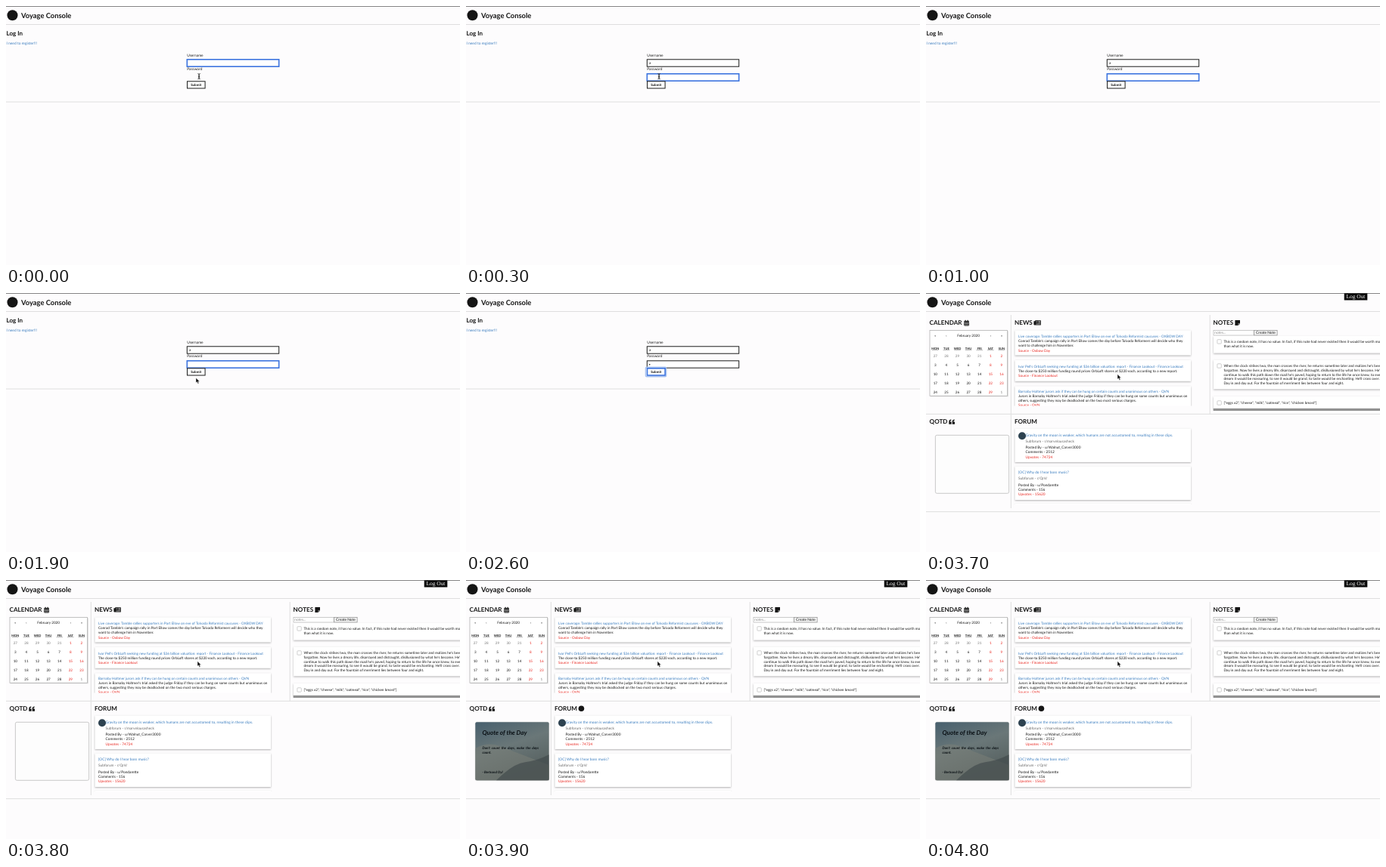
Write an HTML page that moves like this. It is 600 px wide and 343 px high and loops after 5000 ms.

```html
<!DOCTYPE html>
<html lang="en">
<head>
<meta charset="utf-8">
<title>Voyage Console</title>
<style>
html, body { margin: 0; width: 100%; height: 100%; overflow: hidden; background: #fdfcfd; }
svg { display: block; }
text { font-family: Lato, sans-serif; text-rendering: geometricPrecision; white-space: pre; }
.card { fill: #fff; filter: drop-shadow(0 1.4px 1.1px rgba(0, 0, 0, .3)); }
</style>
</head>
<body>
<svg id="stage" xmlns="http://www.w3.org/2000/svg" width="600" height="343" viewBox="0 0 600 343"></svg>
<script>
const LOOP = 5000;
const INK = "#151515", BLUE = "#3579bd", RED = "#e8231c", GREY = "#666", RULE = "#dedede";

const text = (x, y, str, { size = 4.8, fill = INK, extra = "" } = {}) =>
  `<text x="${x}" y="${y}" font-size="${size}" fill="${fill}" ${extra}>${str}</text>`;
const rect = (x, y, w, h, fill, extra = "") =>
  `<rect x="${x}" y="${y}" width="${w}" height="${h}" fill="${fill}" ${extra}/>`;
const line = (x1, y1, x2, y2, color = RULE, width = 1) =>
  `<path d="M${x1} ${y1}L${x2} ${y2}" stroke="${color}" stroke-width="${width}"/>`;
const group = (id, body, extra = "") => `<g id="${id}" ${extra}>${body}</g>`;

const BOLD = 'font-weight="700"', ITALIC = 'font-style="italic"', MIDDLE = 'text-anchor="middle"';
const heading = (x, y, str) => text(x, y, str, { size: 8.1, extra: BOLD });
const card = (x, y, w, h) => rect(x, y, w, h, "#fff", 'class="card"');

function header() {
  return line(0, .5, 600, .5, "#858585") +
    `<circle cx="8.5" cy="12.2" r="7" fill="${INK}"/>` +
    text(20, 15.7, "Voyage Console", { size: 9.4, extra: BOLD }) +
    line(0, 24.5, 600, 24.5);
}

function login() {
  const field = (id, y) => `<rect id="${id}" x="239.3" y="${y}" width="121.4" height="9.4" fill="#fff"/>`;
  return text(.5, 39.2, "Log In", { size: 8, extra: BOLD }) +
    text(.4, 51.2, "I need to register!!!", { fill: BLUE, size: 4.9 }) +
    text(239.3, 66.8, "Username") +
    text(239.3, 85.4, "Password") +
    field("userField", 70.8) + field("passField", 89.8) +
    text(242, 77.2, "a", { extra: 'id="userText"' }) +
    `<circle id="passText" cx="242.7" cy="94.7" r=".8" fill="${INK}"/>` +
    rect(237.4, 98.2, 27.2, 12.6, "none", 'id="glow" rx="1.5" stroke="#a9c3f0" stroke-width="1.4"') +
    rect(239.5, 99.8, 23.6, 9.2, "#fff", 'id="submit"') +
    text(251.2, 106, "Submit", { size: 4.5, extra: `${BOLD} ${MIDDLE}` }) +
    line(0, 127, 600, 127);
}

function calendar() {
  const col = i => 12.3 + i * 14.6;
  const cell = (i, y, str, fill) => text(col(i), y, str, { fill, size: 4.6, extra: MIDDLE });
  let out = heading(4.6, 42, "CALENDAR") +
    rect(50.2, 37, 6.8, 6.4, INK, 'rx=".8"') +
    rect(51.5, 35.8, 1.2, 2, INK) + rect(54.5, 35.8, 1.2, 2, INK) +
    line(50.2, 38.9, 57, 38.9, "#fff", .5) +
    `<path d="M51.2 40.5h5M51.2 42.2h5" stroke="#fff" stroke-width=".9" stroke-dasharray="1.1 .8"/>` +
    rect(5.8, 50.3, 103, 87, "#000", 'opacity=".13"') +
    rect(5, 49.4, 102.6, 86.8, "#fff", 'stroke="#a7a7a7" stroke-width=".7"');
  ["«", "‹", "February 2020", "›", "»"].forEach((s, i) => out += cell([0, 1, 3, 5, 6][i], 57.8, s, INK));
  "MON TUE WED THU FRI SAT SUN".split(" ").forEach((day, i) => {
    out += text(col(i), 74.6, day, { size: 4, extra: `${MIDDLE} ${BOLD}` }) +
      line(col(i) - 4.3, 75.7, col(i) + 4.3, 75.7, "#555", .4);
  });
  for (let i = 0; i < 35; i++) {
    const row = Math.floor(i / 7), day = i - 4;
    const outside = day < 1 || day > 29;
    const label = day < 1 ? day + 31 : day > 29 ? day - 29 : day;
    const fill = i % 7 > 4 && day <= 29 ? RED : outside ? "#777" : INK;
    out += cell(i % 7, 84.8 + row * 12, label, fill);
  }
  return out;
}

const NEWS = [
  [49.4, 33, 58.9, "Live coverage: Tamble rallies supporters in Port Ellow on eve of Tolvada Reformist caucuses - OXBOW DAY",
    ["Conrad Tamble's campaign rally in Port Ellow comes the day before Tolvada Reformers will decide who they",
     "want to challenge him in November."], "Oxbow Day"],
  [88.8, 28, 98.5, "Ivor Pell's OrbLoft seeking new funding at $36 billion valuation: report - Finance Lookout - Finance Lookout",
    ["The close-to $250 million funding round prices OrbLoft shares at $220 each, according to a new report."],
    "Finance Lookout"],
  [123.3, 40, 131.7, "Barnaby Holtmer jurors ask if they can be hung on certain counts and unanimous on others - QVN",
    ["Jurors in Barnaby Holtmer's trial asked the judge Friday if they can be hung on some counts but unanimous on",
     "others, suggesting they may be deadlocked on the two most serious charges."], "QVN"],
];

function news() {
  const size = 4.68;
  const cards = NEWS.map(([top, height, base, title, body, source]) =>
    card(117.5, top, 232.5, height) +
    text(122, base, title, { fill: BLUE, size }) +
    body.map((s, i) => text(122, base + 6.2 * (i + 1), s, { size })).join("") +
    text(122, base + 6.2 * (body.length + 1), "Source - " + source, { fill: RED, size })).join("");
  return heading(117, 42, "NEWS") +
    `<g transform="translate(.7 0)"><path d="M143.5 36.2h7.6v6.4h-8.4q-1 0-1-1v-4.4h1.8z" fill="${INK}"/>` +
    `<path d="M144.7 38.2h2.2M147.8 37.7h2.3M147.8 39.1h2.3M144.7 41h5.4" stroke="#fff" stroke-width=".7"/></g>` +
    group("newsList", cards, 'clip-path="url(#newsClip)"');
}

function notes() {
  const size = 4.66;
  const note = (top, height, base, lines, step = 5.7) =>
    card(380, top, 230, height) +
    rect(384.9, base - 4.4, 5.4, 5.4, "#fff", 'rx=".8" stroke="#bbb" stroke-width=".7"') +
    lines.map((s, i) => text(393.4, base + step * i, s, { size })).join("");
  return heading(379.6, 42, "NOTES") +
    `<path d="M408.4 36h6.6v4.6l-2.2 2.4h-4.4z" fill="${INK}"/><path d="M412.8 43v-2.4h2.2" fill="none" stroke="#fff" stroke-width=".5"/>` +
    note(57, 22.6, 66.1, ["This is a random note, it has no value. In fact, if this note had never existed then it would be worth more",
      "than what it is now."], 6) +
    note(88.5, 38.8, 98.2, [
      "When the clock strikes two, the man crosses the river, he returns sometime later and realizes he's been",
      "forgotten. Now he lives a dreary life, disarrayed and distraught, disillusioned by what he's become. He'll",
      "continue to walk this path down the road he's paved, hoping to return to the life he once knew, to even",
      "dream it would be reassuring, to see it would be grand, to taste would be enchanting. He'll cross over again",
      "Day in and day out. For the fountain of merriment lies between four and eight."]) +
    note(137, 16.5, 147.2, ['["eggs x2", "cheese", "milk", "oatmeal", "rice", "chicken breast"]']) +
    rect(380, 49.4, 53.4, 6.6, "#fff", 'stroke="#aaa" stroke-width=".6"') +
    text(381.3, 54.4, "notes...", { fill: "#888" }) +
    rect(433.7, 49.4, 30.4, 6.6, "#f4f4f4", 'stroke="#777" stroke-width=".6"') +
    text(448.9, 54.4, "Create Note", { extra: MIDDLE }) +
    rect(379.7, 152.8, 221, 3.4, "#929292") + rect(379.7, 156.2, 221, 3, "#fdfcfd");
}

function forum() {
  const post = (top, x, base, title, sub, user, comments, votes) =>
    card(117.5, top, 232.5, 44.5) +
    text(x, base, title, { fill: BLUE }) +
    text(x, base + 7.8, "Subforum - r/" + sub, { fill: GREY }) +
    text(x, base + 16.2, "Posted By - u/" + user) +
    text(x, base + 22.4, "Comments - " + comments) +
    text(x, base + 28.6, "Upvotes - " + votes, { fill: RED });
  const posts =
    post(179.5, 131.6, 189.9, "Gravity on the moon is weaker, which humans are not accustomed to, resulting in these clips.",
      "marvelousasheck", "Walnut_Carver3000", 2512, 74724) +
    `<circle cx="127" cy="189.2" r="5" fill="#2d4250"/>` +
    post(229.5, 122, 239.4, "[OC] Why do I hear boss music?", "QnV", "Pondarette", 156, 15620) +
    card(117.5, 279, 232.5, 44);
  return heading(117, 173.2, "FORUM") +
    `<circle id="forumMark" cx="152.4" cy="170.3" r="3.8" fill="${INK}"/>` +
    group("postList", posts, 'clip-path="url(#postClip)"');
}

function quote() {
  const mark = x => `<path d="M${x} 173.8h-3.3v-3.2q0-3 3-3v1.2q-1.4.1-1.5 1.7h1.8z" fill="${INK}"/>`;
  const slanted = (y, str, size, extra = "") =>
    text(21.4, y, str, { size, fill: "#0b1115", extra: `${ITALIC} ${BOLD} ${extra}` });
  const scene = rect(12.4, 188.3, 97.2, 77, "url(#dusk)", 'rx="2"') +
    `<path d="M12.4 223q16-9 32-3t65.2 25v20.3h-97.2z" fill="#7d8078" opacity=".5"/>` +
    `<path d="M40 265.3q22-22 38-24t31.6-10v34z" fill="#3f494b" opacity=".65"/>` +
    slanted(204.7, "Quote of the Day", 8.2) +
    slanted(224.3, "Don't count the days, make the days", 4.6, 'word-spacing=".8"') +
    slanted(230.1, "count.", 4.6) +
    slanted(255.5, "- Bertrand Oyl", 4.5);
  return heading(4.6, 173.2, "QOTD") + mark(33.6) + mark(38) +
    rect(12.4, 188.3, 97.2, 77, "#fdfdfd", 'rx="2" stroke="#bcbcbc" stroke-width=".8"') +
    group("quoteScene", scene);
}

function dashboard() {
  return rect(552.7, .5, 30.6, 9, "#080808") +
    `<text x="568" y="7.4" font-size="7.4" fill="#fff" text-anchor="middle" style="font-family:'Liberation Serif',serif">Log Out</text>` +
    notes() +
    line(0, 160.3, 600, 160.3) + line(0, 289.7, 600, 289.7) +
    line(112.3, 29, 112.3, 160) + line(375.2, 29, 375.2, 160) + line(112.3, 161, 112.3, 285) +
    calendar() + news() + quote() + forum();
}

const stage = document.getElementById("stage");
stage.innerHTML = `<defs>
  <clipPath id="newsClip">${rect(116, 48, 236, 101.6, "#000")}</clipPath>
  <clipPath id="postClip">${rect(116, 178, 236, 102, "#000")}</clipPath>
  <linearGradient id="dusk" x2=".45" y2="1">
    <stop stop-color="#48606e"/><stop offset=".5" stop-color="#6a7778"/><stop offset="1" stop-color="#56605f"/>
  </linearGradient></defs>` +
  rect(0, 0, 600, 343, "#fdfcfd") + header() +
  group("login", login()) + group("dashboard", dashboard()) +
  `<path id="beam" d="M253.4 89.6q1.7 0 1.7 1v5.2q0 1-1.7 1M256.8 89.6q-1.7 0-1.7 1v5.2q0 1 1.7 1M254 93.8h2.2" fill="none" stroke="#222" stroke-width=".8"/>` +
  `<path id="arrow" d="M0 0v6.6l1.5-1.4 1.1 2.6 1.3-.6-1.1-2.4h2.1z" fill="#000" stroke="#fff" stroke-width=".5"/>`;

const part = Object.fromEntries([...stage.querySelectorAll("[id]")].map(el => [el.id, el]));
const show = (name, on) => part[name].setAttribute("display", on ? "inline" : "none");
const outline = (name, focused) => {
  part[name].setAttribute("stroke", focused ? "#3c74df" : "#1c1c1c");
  part[name].setAttribute("stroke-width", focused ? 1.6 : 1);
};

// Pointer path as [time, x, y]; it is hidden after an entry without a position.
const POINTER = [[0], [1600, 255, 102], [1700, 253, 107], [1800, 251, 111], [1900, 251, 112.4],
  [2000, 251, 111], [2100], [3400, 253, 107.6]];

function render(t) {
  const inside = t >= 3700, loaded = t >= 3900;
  show("login", !inside);
  show("dashboard", inside);
  show("quoteScene", loaded);
  show("forumMark", loaded);

  show("userText", t >= 100);
  show("passField", t >= 100);
  show("passText", t >= 2600);
  show("glow", t >= 2600);
  outline("userField", t < 300);
  outline("passField", t >= 300 && t < 2600);
  outline("submit", t >= 2600);
  part.submit.setAttribute("fill", t >= 2200 && t < 2300 ? "#ececec" : "#fff");

  show("beam", t < 1000);
  const [, x, y] = POINTER.findLast(([start]) => t >= start);
  show("arrow", x !== undefined);
  if (x !== undefined) part.arrow.setAttribute("transform", `translate(${x} ${y})`);
}

const start = performance.now();
function tick() {
  const elapsed = (performance.now() - start) % LOOP;
  render(Math.floor(elapsed / 100) * 100);
  requestAnimationFrame(tick);
}
render(0);
requestAnimationFrame(tick);
</script>
</body>
</html>
```
